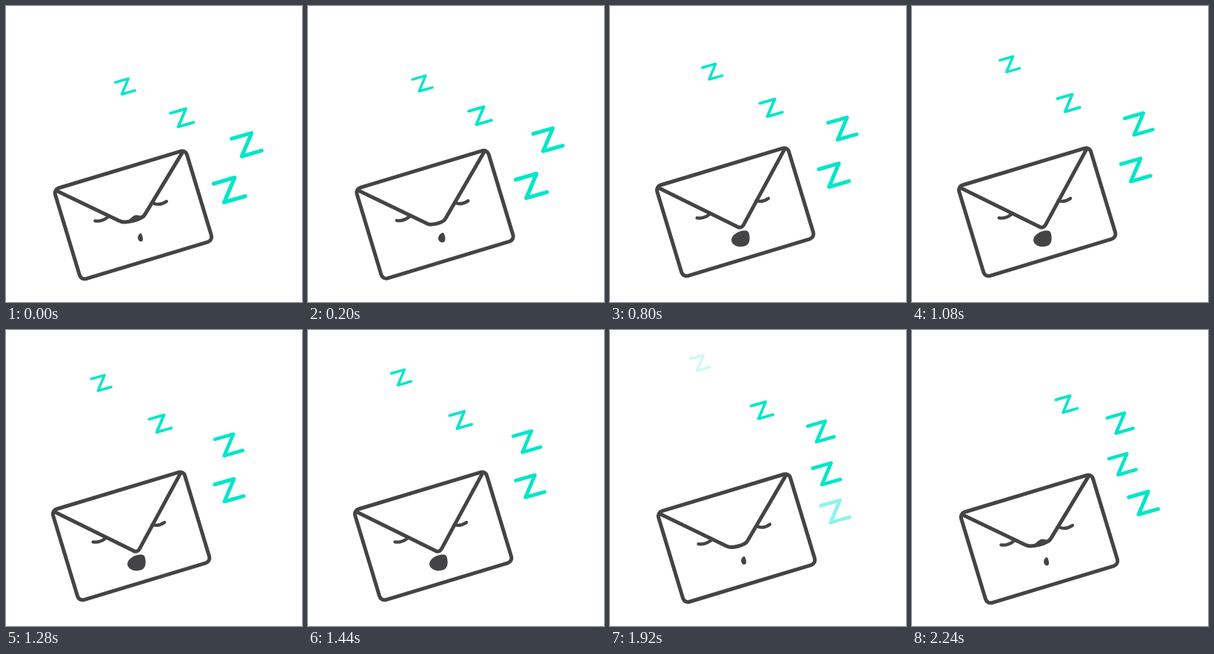
Recreate the animation shown at these times as an HTML page. Size 400 px wide and 400 px high, loop 2.28 s.

```html
<!DOCTYPE html>
<html lang="en">
<head>
<meta charset="utf-8">
<title>Sleeping envelope</title>
<style>
  html, body { margin: 0; width: 100%; height: 100%; overflow: hidden; background: #fff; }
  svg { display: block; width: 100vw; height: 100vh; }
  .line { fill: none; stroke: #444345; stroke-width: 5; stroke-linecap: round; stroke-linejoin: round; }
  .thin { stroke-width: 4.3; }
  .ink { fill: #444345; }
  .zed { fill: none; stroke: #00e6c9; stroke-width: .255; stroke-linecap: round; stroke-linejoin: round; }
</style>
</head>
<body>
<svg viewBox="-.4 -.4 400 400">
  <g id="body">
    <path class="line thin" d="M120 290Q129 291.5 137 285M200 266.5Q208 269.5 216.5 263.5"/>
    <rect class="line" x="-93" y="-64" width="186" height="128" rx="7"
          transform="translate(171.6 282) rotate(-16.8)"/>
    <path class="line" id="flap"/>
    <path class="ink" id="fold" d="M160 291C168 289 170 282 176 282C180 282 182 285 187 282L184 287Q172 292 160 291Z"/>
    <path class="ink" id="mouth" d="M-1 .1C-.95 -.45 -.2 -.95 .35 -.98C.75 -1 .9 -.9 .95 -.5C1.05 0 1 .5 .75 .75C.45 1.05 -.2 1.05 -.55 .85C-.85 .7 -1.02 .4 -1 .1Z"/>
  </g>
  <g id="zeds"></g>
</svg>
<script>
const LOOP = 2280, TICK = 40, STEP = 96, LAST = 23;
const $ = id => document.getElementById(id);

const ramp = (from, to, x) => Math.min(1, Math.max(0, (x - from) / (to - from)));
const ease = (from, to, x) => { const u = ramp(from, to, x); return u * u * (3 - 2 * u); };
const mix = (a, b, u) => a + (b - a) * u;
const mixAll = (a, b, u) => a.map((v, i) => mix(v, b[i], u));

// Rises from the first step until `full`, falls again between `from` and `to`
const breath = (full, from, to, step) => ease(0, full, step) * (1 - ease(from, to, step));

// Bezier point by repeated mixing
function bezier(points, u) {
  while (points.length > 1) points = points.slice(1).map((p, i) => mixAll(points[i], p, u));
  return points[0];
}

// Curve of the flap's tip, breathing out and in
const tipOut = [174, 301.6, 177.5, 303.6, 180.8, 303.2, 182.8, 299.5];
const tipIn = [153, 290, 159, 294, 184, 288.5, 187.5, 281];

// Each letter drifts along a curve while its size changes
const zeds = [
  { path: [[160.5, 108.3], [138.6, 96.4], [123.8, 70.9], [121.5, 44]], size: [13.5, 13.5], end: 20,
    alpha: step => 1 - ramp(16, 21, step) },
  { path: [[237.5, 150.7], [217, 140.7], [195.5, 121.4], [208.5, 99.8]], size: [15.5, 14.5] },
  { path: [[324.8, 187], [324.2, 159.3], [286.4, 157.9], [281, 125.5]], size: [20.2, 17.6] },
  { path: [[301.5, 248.2], [300.9, 225.9], [308.9, 217.6], [284, 181]], size: [21.3, 18.3] },
  { path: [[298.5, 252.3], [312.3, 233.5]], size: [19, 19.8], start: 18,
    alpha: step => ramp(18, 22.5, step) }
];

for (const z of zeds) {
  z.el = document.createElementNS("http://www.w3.org/2000/svg", "path");
  z.el.setAttribute("class", "zed");
  z.el.setAttribute("d", "M-1 -.4L.33 -.78L-.33 .78L1 .4");
  $("zeds").append(z.el);
}

function draw(step) {
  const lift = breath(8, 15, 23, step);
  $("body").setAttribute("transform", `translate(${-2.8 * lift} ${-4 * lift})`);

  const pull = 1 - breath(5, 16, 22, step);
  const [x, y, ...curve] = mixAll(tipOut, tipIn, pull);
  $("flap").setAttribute("d", `M67.5 249.2L${x} ${y}C${curve}L238.6 196.5`);
  const fold = ramp(.85, 1, pull);
  $("fold").setAttribute("transform", `translate(0 ${290 * (1 - fold)}) scale(1 ${fold})`);

  const yawn = breath(8, 15, 20, step);
  $("mouth").setAttribute("transform",
    `translate(${mix(181, 178.8, yawn)} ${mix(312.6, 317.9, yawn)}) ` +
    `rotate(${mix(-14, 0, yawn)}) scale(${mix(3.4, 12.3, yawn)} ${mix(5.5, 11, yawn)})`);

  for (const { el, path, size, start = 0, end = LAST, alpha } of zeds) {
    const u = ramp(start, end, step);
    el.setAttribute("transform", `translate(${bezier(path, u)}) scale(${mix(...size, u)})`);
    el.setAttribute("opacity", alpha ? alpha(step) : 1);
  }
}

// Drawings are held: one per STEP, shown on the next TICK
let shown = -1;
function play() {
  const time = performance.now() % LOOP;
  const step = Math.floor(Math.floor(time / TICK) * TICK / STEP);
  if (step !== shown) draw(shown = step);
  requestAnimationFrame(play);
}
play();
</script>
</body>
</html>
```
